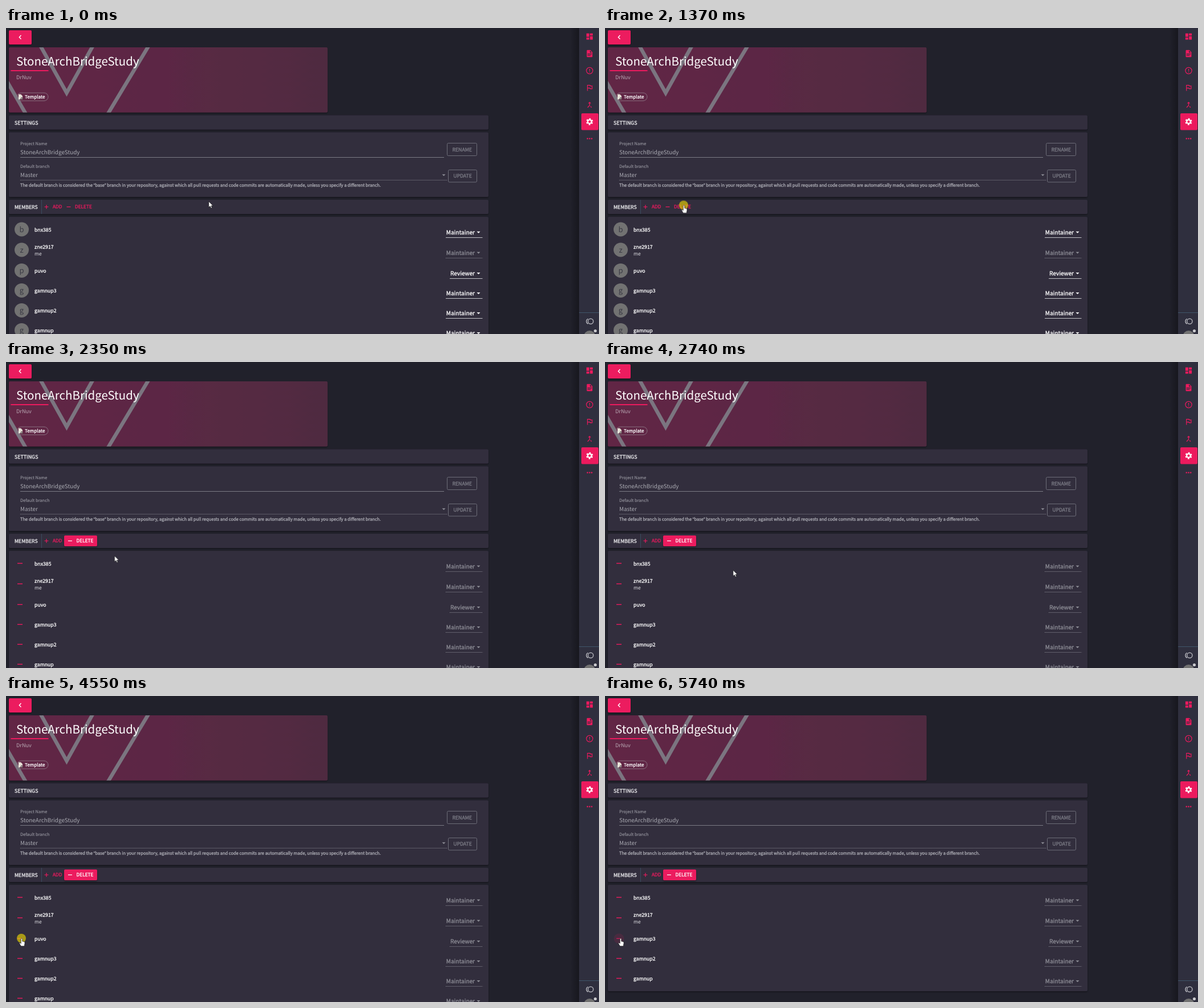
These frames come from a looping animation (1041 px wide and 538 px high, 6260 ms). An HTML page:

```html
<!DOCTYPE html>
<html lang="en">
<head>
<meta charset="utf-8">
<title>Project settings</title>
<style>
  html, body { margin: 0; width: 100%; height: 100%; overflow: hidden; background: #21212b; }
  svg { display: block; width: 1041px; height: 538px; }
  text {
    font-family: "Noto Sans CJK KR", "Noto Sans CJK JP", "Noto Sans CJK", sans-serif;
    text-rendering: geometricPrecision;
    stroke-width: 0;
  }
  .strong { stroke-width: .3px; }
  .quote { font-family: "Noto Sans", sans-serif; }
</style>
</head>
<body>
<svg id="stage" viewBox="0 0 1041 538"></svg>
<script>
const LOOP = 6260;
const PINK = '#ec1a5e', PANEL = '#302f3e', DIM = '#8e8e97', LABEL = '#a9a9b1', WHITE = '#fff';
const TOGGLE = 1520, REMOVE = 5740;

// Markup helpers
const text = (x, y, size, fill, str, extra = '') =>
  `<text x="${x}" y="${y}" font-size="${size}" fill="${fill}" stroke="${fill}" ${extra}>${str}</text>`;
const rect = (x, y, w, h, fill, extra = '') =>
  `<rect x="${x}" y="${y}" width="${w}" height="${h}" rx="2" fill="${fill}" ${extra}/>`;
const panel = (y, h, extra = '') => rect(5, y, 842, h, PANEL, `filter="url(#lift)" ${extra}`);
const line = (x1, x2, y, color, extra = '') =>
  `<path d="M${x1},${y}H${x2}" stroke="${color}" ${extra}/>`;
const caret = (x, y, fill) => `<path d="M${x - 3},${y - 1.3}h6l-3,3z" fill="${fill}"/>`;
const group = (id, body, extra = '') => `<g id="${id}" ${extra}>${body}</g>`;
const icon = (y, body, color = PINK) =>
  `<g transform="translate(1024.5 ${y}) scale(.62) translate(-12 -12)" fill="${color}">${body}</g>`;
const path = d => `<path d="${d}"/>`;
const STRONG = 'class="strong"';
const DOTTED = 'stroke-dasharray="1 1"';

const rows = [354, 390, 426.4, 461.4, 496.4, 531.4];
const names = ['bnx385', 'zne2917', 'puvo', 'gamnup3', 'gamnup2', 'gamnup'];
const roleY = [359, 395, 431.3, 466.3, 501.3, 536.3];

const nameAt = (name, i) => i === 1
  ? text(50, 387.6, 8.7, WHITE, name, STRONG) + text(50, 400, 8.7, '#dcdce0', 'me')
  : text(50, rows[i] + 3.5, 8.7, WHITE, name, STRONG);

const avatar = (name, i) =>
  `<circle cx="27.5" cy="${rows[i]}" r="12.5" fill="#727272"/>` +
  text(27.5, rows[i] + 4.6, 13, '#3a3a44', name[0], 'text-anchor="middle"');

const minus = (_, i) =>
  `<path id="minus${i}" d="M20,${rows[i]}h9" stroke="${PINK}" stroke-width="1.4"/>`;

const role = (y, i, disabled) => {
  const reviewer = i === 2, color = disabled ? DIM : WHITE;
  return text(823, y + 3.7, 10.05, color, reviewer ? 'Reviewer' : 'Maintainer', `text-anchor="end" ${STRONG}`) +
    caret(829.5, y, color) +
    line(reviewer ? 779 : 772, 836.5, Math.floor(y) + 9.5, disabled ? DIM : '#c1c1c6', disabled ? DOTTED : '');
};

const banner = `
  ${rect(5, 34, 559.5, 114.5, 'url(#wine)', 'filter="url(#lift)"')}
  <path clip-path="url(#bannerClip)" fill="none" stroke="#7b7580" stroke-width="6.500"
    d="M58,27L106.500,114L155,27M-1,89L36,153M177,154L252.500,28"/>
  ${text(18, 66, 20.5, WHITE, 'StoneArchBridgeStudy')}
  ${rect(8, 74, 67, 2, PINK)}
  ${text(18, 89.9, 9.2, '#b9a9b4', 'DrNuv')}
  <rect x="19.500" y="114" width="54.500" height="14" rx="7" fill="none" stroke="#8d7785" stroke-width=".9"/>
  <path d="M22,116.500h4l3,3v6h-7z" fill="#e9e4da"/>
  <path d="M25,125.500l2.500,-4l2.500,4z" fill="#9a9a94" stroke="#4a2a3c" stroke-width=".6"/>
  ${text(33, 124.2, 8.1, WHITE, 'Template', STRONG)}`;

const settings = `
  ${panel(153.5, 25)}
  ${text(15, 169.7, 8.85, '#f2f2f4', 'SETTINGS', STRONG)}
  ${panel(183.5, 113.5)}
  ${text(25, 206.2, 7.5, LABEL, 'Project Name')}
  ${text(25, 222.3, 9.95, LABEL, 'StoneArchBridgeStudy')}
  ${line(25, 769, 227.5, '#7b7b85')}
  ${text(25, 246.3, 7.5, LABEL, 'Default branch')}
  ${text(25, 261.8, 9.9, LABEL, 'Master')}
  ${caret(768.5, 258.5, DIM)}
  ${line(25, 775, 267.5, '#85858f', DOTTED)}
  ${text(25, 279.2, 7.52, '#acacb4', 'The default branch is considered the <tspan class="quote">“</tspan>base<tspan class="quote">”</tspan> branch in your repository, against which all pull requests and code commits are automatically made, unless you specify a different branch.', STRONG)}
  ${rect(774.5, 202.5, 52, 22, 'none', 'stroke="#6d6d78"')}
  ${text(800.7, 216.8, 8.75, '#7d7d87', 'RENAME', `text-anchor="middle" ${STRONG}`)}
  ${rect(776.5, 249.5, 50, 21.5, 'none', 'stroke="#6d6d78"')}
  ${text(801.5, 263.4, 8.7, '#7d7d87', 'UPDATE', `text-anchor="middle" ${STRONG}`)}`;

const members = `
  ${panel(302, 25)}
  ${text(15, 317.6, 8.7, '#f2f2f4', 'MEMBERS', STRONG)}
  <path d="M62.500,302v25" stroke="#3a4a5e"/>
  <path d="M67.500,314.500h7M71,311v7" stroke="${PINK}" stroke-width="1.200"/>
  ${text(82, 317.4, 8.3, PINK, 'ADD', STRONG)}
  ${group('deleteIdle', line(106.5, 113.5, 314.5, PINK, 'stroke-width="1.2"') +
    text(121, 317.4, 8.3, PINK, 'DELETE', STRONG))}
  ${group('deleteActive', rect(102, 305, 58, 19, PINK, 'filter="url(#lift)"') +
    line(109, 116, 314.5, WHITE, 'stroke-width="1.2"') +
    text(123.5, 317.4, 8.35, WHITE, 'DELETE', STRONG))}
  ${group('tallPanel', panel(332, 220))}
  ${group('shortPanel', panel(332, 187))}
  ${group('avatars', names.map(avatar).join(''))}
  ${group('minuses', names.slice(0, 5).map(minus).join(''))}
  ${group('lastMinus', minus('', 5))}
  ${names.slice(0, 2).map(nameAt).join('')}
  ${group('namesBefore', names.slice(2).map((n, i) => nameAt(n, i + 2)).join(''))}
  ${group('namesAfter', names.slice(3).map((n, i) => nameAt(n, i + 2)).join(''))}
  ${group('rolesOn', roleY.map((y, i) => role(y, i, i === 1)).join(''))}
  ${group('rolesOff', roleY.slice(0, 5).map((y, i) => role(y, i, true)).join(''))}
  ${group('lastRoleOff', role(roleY[5], 5, true))}
  <circle id="ripple" cx="24.500" cy="426.500" r="9" fill="${PINK}"/>`;

const sidebar = `
  <rect x="990" y="0" width="16" height="538" fill="url(#edge)"/>
  <rect x="1006" y="0" width="35" height="538" fill="#2f2f3e"/>
  ${rect(1010, 150, 30, 29.5, PINK)}
  ${icon(15, path('M13,3V9H21V3M13,21H21V11H13M3,21H11V15H3M3,13H11V3H3V13Z'))}
  ${icon(45, path('M13,9H18.500L13,3.500V9M6,2H14L20,8V20A2,2 0 0,1 18,22H6A2,2 0 0,1 4,20V4A2,2 0 0,1 6,2M15,18V16H6V18H15M18,14V12H6V14H18Z'))}
  ${icon(75, `<circle cx="12" cy="12" r="9" fill="none" stroke="${PINK}" stroke-width="2"/>` + path('M11,7h2v6h-2zM11,15h2v2h-2z'))}
  ${icon(105, path('M12.360,6L12.760,8H18V14H14.640L14.240,12H7V6H12.360M14,4H5V21H7V14H12.600L13,16H20V6H14.400Z'))}
  ${icon(135, path('M17,20.400L18.400,19L15,15.600L13.600,17M7.500,8H11V13.600L5.600,19L7,20.400L13,14.400V8H16.500L12,3.500Z'))}
  ${icon(164.7, `<g fill="none" stroke="#fff"><circle cx="12" cy="12" r="5.300" stroke-width="3.600"/>
    <circle cx="12" cy="12" r="8" stroke-width="3.400" stroke-dasharray="4.400 3.978" transform="rotate(14 12 12)"/></g>`)}
  ${icon(194.5, [6, 12, 18].map(x => `<circle cx="${x}" cy="12" r="2"/>`).join(''))}
  ${line(1006, 1041, 500.5, '#3f566b')}
  ${icon(515.7, `<g fill="none" stroke="#c6c6cc" stroke-width="2"><circle cx="15" cy="12" r="7.500"/>
    <path d="M7.500,4.800A8,8 0 0 0 7.500,19.200"/></g>`, 'none')}
  <circle cx="1024.500" cy="542" r="10" fill="#727272"/>
  <circle cx="1034.500" cy="532.500" r="2.600" fill="#c9c9cd"/>`;

const pointer = group('cursor', `
  <circle id="press" r="8" fill="#f0dc00" opacity="0"/>
  <path id="arrow" fill="#fff" stroke="#111" stroke-width=".6"
    d="M0,0V10.300L2.400,8.100L4,11.800L5.700,11L4.100,7.500H7.300Z"/>
  <path id="hand" fill="#fff" stroke="#111" stroke-width=".6"
    d="M-.700,1.400a1.200,1.200 0 0 1 2.400,0V5.200L5,6Q6.300,6.500 6.100,8.300L5.200,13.800H-.600L-3.300,9.300Q-3.500,7.600 -2,7.900L-.700,9.200Z"/>`);

document.getElementById('stage').innerHTML = `
  <defs>
    <filter id="lift" x="-5%" y="-20%" width="110%" height="150%">
      <feDropShadow dx="0" dy="1.300" stdDeviation="1.300" flood-color="#000" flood-opacity=".4"/>
    </filter>
    <linearGradient id="wine"><stop stop-color="#622645"/><stop offset=".5" stop-color="#5b2844"/>
      <stop offset="1" stop-color="#4f2c41"/></linearGradient>
    <linearGradient id="edge"><stop stop-color="#000" stop-opacity="0"/>
      <stop offset="1" stop-color="#000" stop-opacity=".3"/></linearGradient>
    <clipPath id="bannerClip"><rect x="5" y="34" width="559.500" height="114.500" rx="2"/></clipPath>
  </defs>
  <rect width="1041" height="538" fill="#21212b"/>
  ${rect(5, 4, 40, 25, PINK, 'filter="url(#lift)"')}
  <path d="M26.500,12.800L23.300,16.200L26.500,19.600" fill="none" stroke="#fff" stroke-width="1.400"/>
  ${banner}${settings}${members}${sidebar}${pointer}`;

// Steps are [ms, value]; the first and last values hold to the ends of the loop.
function play(id, prop, steps, easing = 'linear') {
  const all = [[0, steps[0][1]], ...steps, [LOOP, steps.at(-1)[1]]];
  const frames = all.map(([ms, value]) => ({ offset: ms / LOOP, [prop]: value, easing }));
  document.getElementById(id).animate(frames, { duration: LOOP, iterations: Infinity });
}
const fade = (id, ...steps) => play(id, 'opacity', steps);
const cut = (id, ...steps) => play(id, 'opacity', steps, 'step-end');

const track = [
  [180, 356, 305], [300, 332, 306], [480, 267, 308], [660, 200, 311], [780, 168, 312],
  [900, 152, 312], [1140, 138, 311.5], [2000, 138, 311.5], [2150, 152, 320],
  [2400, 200, 346], [2610, 223, 361], [2740, 225, 366], [2830, 214, 370],
  [3000, 142, 393], [3230, 55, 418], [3380, 36, 421.500], [3480, 36, 421.500],
  [3620, 31, 424], [3780, 27, 426]
];
play('cursor', 'transform', track.map(([ms, x, y]) => [ms, `translate(${x}px, ${y}px)`]));

const handTimes = [[0, 0], [870, 1], [2210, 0], [3560, 1]];
cut('hand', ...handTimes);
cut('arrow', ...handTimes.map(([ms, on]) => [ms, 1 - on]));
cut('press', [0, 0], [1370, .62], [1500, 0], [4550, .62], [4740, 0]);

fade('deleteActive', [TOGGLE, 0], [TOGGLE + 240, 1]);
fade('deleteIdle', [TOGGLE, 1], [TOGGLE + 120, 0]);
for (const id of ['avatars', 'rolesOn']) cut(id, [0, 1], [TOGGLE, 0]);
for (const id of ['minuses', 'rolesOff']) cut(id, [0, 0], [TOGGLE, 1]);
for (const id of ['lastMinus', 'lastRoleOff']) cut(id, [0, 0], [TOGGLE, 1], [REMOVE, 0]);
for (const id of ['tallPanel', 'namesBefore']) cut(id, [0, 1], [REMOVE, 0]);
for (const id of ['shortPanel', 'namesAfter']) cut(id, [0, 0], [REMOVE, 1]);
fade('ripple', [4550, 0], [4740, .22], [4910, .16], [5230, .16], [5320, .12]);
cut('minus2', [0, 1], [REMOVE, .75]);
</script>
</body>
</html>
```
